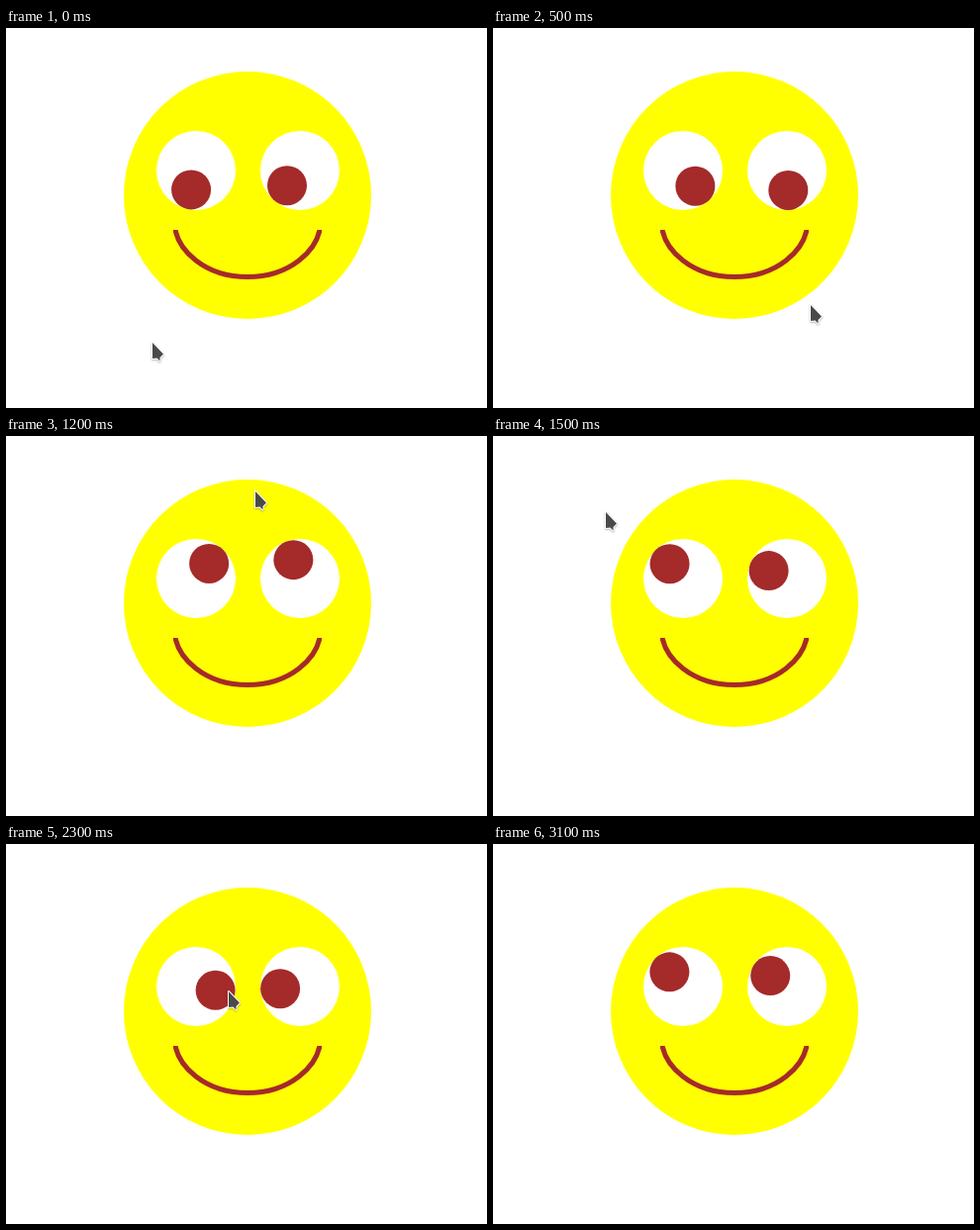
Write an HTML page with a canvas that moves like this. It is 486 px wide and 384 px high and loops after 3.3 s.

```html
<!DOCTYPE html>
<html lang="en">
<head>
<meta charset="utf-8">
<title>Watching eyes</title>
<style>
  html, body { margin: 0; width: 100%; height: 100%; overflow: hidden; background: #fff; }
  canvas { display: block; }
</style>
</head>
<body>
<canvas id="stage" width="486" height="384"></canvas>
<script>
const ctx = document.getElementById('stage').getContext('2d');
const LOOP = 3300;
const STEP = 100;
const REST = 24;  // step at which the pointer rests for one more tick
const END = 30;
const LAG = 0.3;  // the eyes trail the pointer by this part of a step
const BROWN = '#a52a2a';

// Turning points of the pointer: step, x, y
const keys = [
  [0, 148, 318], [3, 213, 320], [5, 321, 280], [6, 341, 212], [9, 371, 96],
  [13, 206, 52], [15, 114, 77], [17, 82, 150], [18, 109, 195], [19, 183, 202],
  [21, 254, 170], [23, 225, 149], [REST, 219, 148], [END, 30, -30]
];

const clamp = (v, lo, hi) => Math.min(hi, Math.max(lo, v));

// Speed at a key, taken from its neighbours; zero at both ends
function speed(i, axis) {
  if (i === 0 || i === keys.length - 1) return 0;
  const [a, b] = [keys[i - 1], keys[i + 1]];
  return (b[axis] - a[axis]) / (b[0] - a[0]);
}

// Smooth cubic path through the keys
function pointerAt(step) {
  step = clamp(step, 0, END);
  const i = Math.max(1, keys.findIndex(key => key[0] >= step));
  const [a, b] = [keys[i - 1], keys[i]];
  const span = b[0] - a[0];
  const u = (step - a[0]) / span;
  const v = 1 - u;
  return [1, 2].map(axis =>
    v * v * (1 + 2 * u) * a[axis] + u * u * (1 + 2 * v) * b[axis] +
    u * v * span * (v * speed(i - 1, axis) - u * speed(i, axis)));
}

function disc(x, y, r, color) {
  ctx.fillStyle = color;
  ctx.beginPath();
  ctx.arc(x, y, r, 0, 2 * Math.PI);
  ctx.fill();
}

function drawEye(x, y, [tx, ty]) {
  const angle = Math.atan2(ty - y, tx - x);
  disc(x, y, 40, '#fff');
  disc(x + 20 * Math.cos(angle), y + 20 * Math.sin(angle), 20, BROWN);
}

// Lower part of an ellipse, cut off by a box
function drawSmile() {
  ctx.save();
  ctx.beginPath();
  ctx.rect(169, 204, 150, 50);
  ctx.clip();
  ctx.strokeStyle = BROWN;
  ctx.lineWidth = 5;
  ctx.beginPath();
  ctx.ellipse(244, 194, 74, 57.5, 0, 0, Math.PI);
  ctx.stroke();
  ctx.restore();
}

function drawPointer(x, y) {
  ctx.save();
  ctx.translate(x, y);
  const shape = new Path2D('M0 0V16L4.5 15.5L7.5 18.5V15L11 11.5Z');
  ctx.lineJoin = 'round';
  ctx.lineWidth = 2;
  ctx.strokeStyle = '#fff';
  ctx.shadowColor = 'rgba(0, 0, 0, 0.3)';
  ctx.shadowBlur = 2;
  ctx.shadowOffsetY = 1;
  ctx.stroke(shape);
  ctx.shadowColor = 'transparent';
  ctx.fillStyle = '#4a4a4a';
  ctx.fill(shape);
  ctx.restore();
}

function stepAt(time) {
  const tick = Math.floor((time % LOOP) / STEP);
  return Math.min(tick > REST ? tick - 1 : tick, END);
}

function draw(time) {
  const step = stepAt(time);
  const target = pointerAt(step - LAG);
  ctx.fillStyle = '#fff';
  ctx.fillRect(0, 0, 486, 384);
  disc(244, 169, 125, '#ff0');
  drawEye(192, 144, target);
  drawEye(297, 144, target);
  drawSmile();
  drawPointer(...pointerAt(step).map(Math.round));
}

const start = performance.now();
function frame() {
  draw(performance.now() - start);
  requestAnimationFrame(frame);
}
frame();
</script>
</body>
</html>
```
